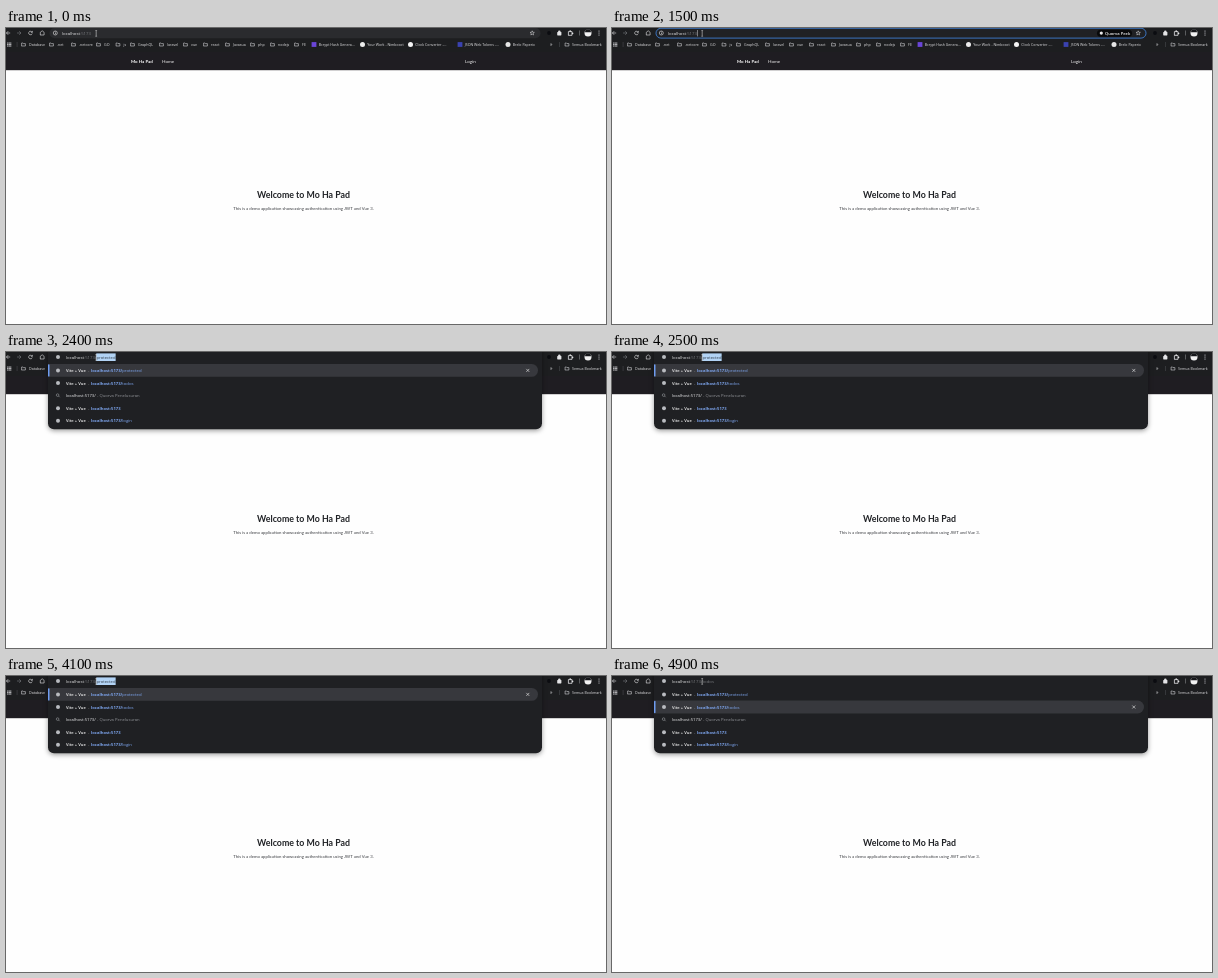
Recreate the animation shown at these times as an HTML page with a canvas. Size 600 by 296 pixels, loop 5 s.

```html
<!DOCTYPE html>
<html lang="en">
<head>
<meta charset="utf-8">
<title>Browser demo</title>
<style>
html, body { margin: 0; width: 100%; height: 100%; overflow: hidden; background: #fefefe; }
canvas { display: block; width: 600px; height: 296px; }
</style>
</head>
<body>
<canvas id="stage"></canvas>
<script>
const W = 600, H = 296, LOOP = 5000;
const FOCUS = 400, DESELECT = 1200, SUGGEST = 2400, NEXT = 4600;
const UI = '"Open Sans", "Noto Sans", sans-serif';
const PAGE = 'Lato, "Open Sans", sans-serif';
const BAR = '#1d1e20', LIGHT = '#e4e4e6', DIM = '#77797d', BLUE = '#7ea6f0';

const canvas = document.getElementById('stage');
const ctx = canvas.getContext('2d');
const ratio = window.devicePixelRatio || 1;
canvas.width = W * ratio;
canvas.height = H * ratio;
ctx.scale(ratio, ratio);

function rect(x, y, w, h, color) {
  ctx.fillStyle = color;
  ctx.fillRect(x, y, w, h);
}

function round(x, y, w, h, r, color) {
  ctx.beginPath();
  ctx.roundRect(x, y, w, h, r);
  ctx.fillStyle = color;
  ctx.fill();
}

function dot(x, y, r, color) {
  ctx.beginPath();
  ctx.arc(x, y, r, 0, 7);
  ctx.fillStyle = color;
  ctx.fill();
}

function ring(x, y, r, color, from = 0, to = Math.PI * 2) {
  ctx.beginPath();
  ctx.arc(x, y, r, from, to);
  ctx.strokeStyle = color;
  ctx.lineWidth = 0.6;
  ctx.stroke();
}

function line(points, color = LIGHT, width = 0.6) {
  ctx.beginPath();
  points.forEach(([x, y]) => ctx.lineTo(x, y));
  ctx.strokeStyle = color;
  ctx.lineWidth = width;
  ctx.stroke();
}

// Draws a string and returns the x where it ends.
function text(s, x, y, size, color, weight = 400, family = UI, align = 'left') {
  ctx.font = `${weight} ${size}px ${family}`;
  ctx.textAlign = align;
  ctx.fillStyle = color;
  ctx.fillText(s, x, y);
  return x + ctx.measureText(s).width;
}

function folder(x, y) {
  line([[x - 1.9, y + 1.5], [x - 1.9, y - 1.5], [x - 0.5, y - 1.5], [x, y - 0.9],
    [x + 1.9, y - 0.9], [x + 1.9, y + 1.5], [x - 2.1, y + 1.5]], '#cfcfd2');
}

const folders = [
  ['Database', 17.5], ['.net', 45.5], ['.netcore', 67.5], ['GO', 92.5], ['js', 112],
  ['GraphQL', 126.5], ['laravel', 155.5], ['vue', 179.5], ['react', 199.5],
  ['Javasua', 221.5], ['php', 246.5], ['nodejs', 266.5], ['FE', 290.5]
];
const sites = [
  ['Bcrypt Hash Genera...', 308, '#6a45d8', true], ['Your Work - Nimbocot', 356.5, '#ececec'],
  ['Clock Converter -...', 404.5, '#f4f4f4'], ['JSON Web Tokens -...', 454, '#3a42b0', true],
  ['Brelo Paperix', 502, '#e6e6e6']
];

function bookmarks() {
  const y = 16.5, base = 17.9;
  for (let i = 0; i < 9; i++) {
    rect(1.2 + (i % 3) * 1.5, 14.5 + Math.floor(i / 3) * 1.5, 1.1, 1.1, '#d0d0d3');
  }
  rect(10.8, 14, 0.5, 5, '#505256');
  folders.forEach(([name, x]) => {
    folder(x, y);
    text(name, x + 5.6, base, 3.6, LIGHT);
  });
  sites.forEach(([name, x, color, square]) => {
    if (square) rect(x - 2.4, y - 2.4, 4.8, 4.8, color);
    else dot(x, y, 2.5, color);
    text(name, x + 4.8, base, 3.55, LIGHT);
  });
  text('»', 544, 18.2, 5, LIGHT);
  rect(553.5, 14, 0.5, 5, '#505256');
  folder(561, y);
  text('Semua Bookmark', 566, base, 3.6, LIGHT);
}

function toolbar() {
  const y = 5;
  line([[4.2, y], [0.4, y]]);
  line([[2.2, y - 1.8], [0.4, y], [2.2, y + 1.8]]);
  line([[11, y], [15, y]], DIM);
  line([[13.2, y - 1.8], [15, y], [13.2, y + 1.8]], DIM);
  ring(24.5, y, 1.8, LIGHT, 0.3, 5.6);
  line([[26.4, 2.9], [26.4, 4.4], [24.9, 4.4]]);
  line([[34.3, 7], [34.3, 4.3], [36.2, 2.8], [38.1, 4.3], [38.1, 7], [34.1, 7]]);

  dot(543, y, 1.9, '#0b0c10');
  round(551.2, 4, 4.2, 3.4, 0.6, LIGHT);
  dot(553.3, 3.6, 1.2, LIGHT);
  line([[562.4, 7.3], [562.4, 3.6], [566, 3.6], [566, 7.3], [562.2, 7.3]], LIGHT, 0.8);
  dot(564.2, 3.1, 0.8, LIGHT);
  dot(566.6, 5.4, 0.8, LIGHT);
  rect(573, 2.5, 0.6, 5, '#85878b');
  dot(582, y, 3.5, '#f2f2f2');
  ctx.beginPath();
  ctx.arc(582, 4.2, 3, Math.PI, 0);
  ctx.fillStyle = '#16171a';
  ctx.fill();
  [3, 5, 7].forEach(v => dot(593, v, 0.55, LIGHT));
}

function star(x, y) {
  const points = [];
  for (let i = 0; i <= 10; i++) {
    const a = i * Math.PI / 5 - Math.PI / 2, r = i % 2 ? 1 : 2.3;
    points.push([x + r * Math.cos(a), y + r * Math.sin(a)]);
  }
  line(points, LIGHT, 0.5);
}

function beam() {
  line([[90.2, 2.6], [90.2, 8.2]], '#f0f0f0', 0.5);
  line([[89.3, 2.5], [91.1, 2.5]], '#f0f0f0', 0.4);
  line([[89.3, 8.3], [91.1, 8.3]], '#f0f0f0', 0.4);
}

function addressBar(focused, selected) {
  round(43.5, 0, 491, 10.3, 5.1, focused ? '#202124' : '#2a2b2e');
  if (focused) {
    ctx.beginPath();
    ctx.roundRect(44, 0.3, 490, 9.8, 4.9);
    ctx.strokeStyle = '#3f7dd0';
    ctx.lineWidth = 0.9;
    ctx.stroke();
    round(485, 1.7, 35, 7, 3.5, '#08090a');
    dot(489.3, 5.1, 1.6, '#e8e8e8');
    text('Quorva Peek', 493, 6.6, 4.1, '#f4f4f4', 600);
  }
  ring(49.3, 5, 2, LIGHT);
  rect(49, 4.6, 0.6, 1.6, LIGHT);
  rect(49, 3.6, 0.6, 0.6, LIGHT);
  star(526.2, 5.1);

  let x = text('localhost', 56, 6.6, 4.3, LIGHT);
  x = text(':', x, 6.6, 4.3, DIM);
  if (selected) rect(x - 0.4, 1.6, 10.4, 7.4, '#a9cdf2');
  x = text('5173', x, 6.6, 4.3, selected ? '#34414f' : DIM);
  if (focused && !selected) rect(x + 0.3, 2, 0.5, 6.4, '#d8d8da');
}

function suggestion(path, y, active) {
  if (active) {
    round(42.5, y - 6.4, 489.5, 12.8, [0, 6.4, 6.4, 0], '#37383d');
    round(42, y - 6.2, 1.5, 12.4, 0.7, '#6f9cf0');
    line([[520.3, y - 1.5], [523.3, y + 1.5]], '#f0f0f0');
    line([[523.3, y - 1.5], [520.3, y + 1.5]], '#f0f0f0');
  }
  dot(52, y, 2, '#b9bbc0');
  text('Vite + Vue', 60, y + 1.5, 4.15, '#f2f2f2', 600);
  text('-', 82, y + 1.5, 4.2, '#a0a2a6');
  const x = text('localhost:5173' + (path && '/'), 85, y + 1.5, 4.15, BLUE, 700);
  text(path, x, y + 1.5, 4.3, BLUE);
}

function dropdown(second) {
  ctx.save();
  ctx.shadowColor = 'rgba(0,0,0,0.4)';
  ctx.shadowBlur = 5 * ratio;
  ctx.shadowOffsetY = 1.5 * ratio;
  round(42, -8, 494, 85.3, 6, '#1f2023');
  ctx.restore();

  dot(52, 5, 2, '#b9bbc0');
  let x = text('localhost', 60, 6.6, 4.3, LIGHT);
  x = text(':5173/', x, 6.6, 4.3, DIM);
  if (second) {
    text('todos', x, 6.6, 4.3, DIM);
  } else {
    rect(x - 0.3, 1.4, 19.4, 7.6, '#b2d3f5');
    text('protected', x, 6.6, 4.2, '#303b48');
  }

  suggestion('protected', 18.4, !second);
  suggestion('todos', 31, second);
  ring(51.6, 43.1, 1.3, '#989a9e');
  line([[52.5, 44], [53.7, 45.2]], '#989a9e');
  text('localhost:5173/', 60, 45.1, 4.2, '#ededef');
  text('- Quorva Penelusuran', 91, 45.1, 4.2, '#929499');
  suggestion('', 56.2, false);
  suggestion('login', 68.8, false);
}

function page() {
  rect(0, 0, W, H, '#fefefe');
  rect(0, 24, W, 18.2, '#1f1d22');
  text('Mo Ha Pad', 125, 34.6, 4.45, '#ffffff', 700, PAGE);
  text('Home', 156, 34.6, 4.6, '#f0f0f0', 400, PAGE);
  text('Login', 459, 34.6, 4.6, '#f0f0f0', 400, PAGE);
  text('Welcome to Mo Ha Pad', 297.5, 170.2, 8.8, '#202226', 700, PAGE, 'center');
  text('This is a demo application showcasing authentication using JWT and Vue 3.',
    297.5, 181.9, 4.25, '#3a3c40', 400, PAGE, 'center');
}

function draw(t) {
  page();
  rect(0, 0, W, 24, BAR);
  toolbar();
  bookmarks();
  if (t < SUGGEST) addressBar(t >= FOCUS, t >= FOCUS && t < DESELECT);
  else dropdown(t >= NEXT);
  beam();
}

const start = performance.now();
function tick() {
  draw((performance.now() - start) % LOOP);
  requestAnimationFrame(tick);
}
tick();
</script>
</body>
</html>
```
